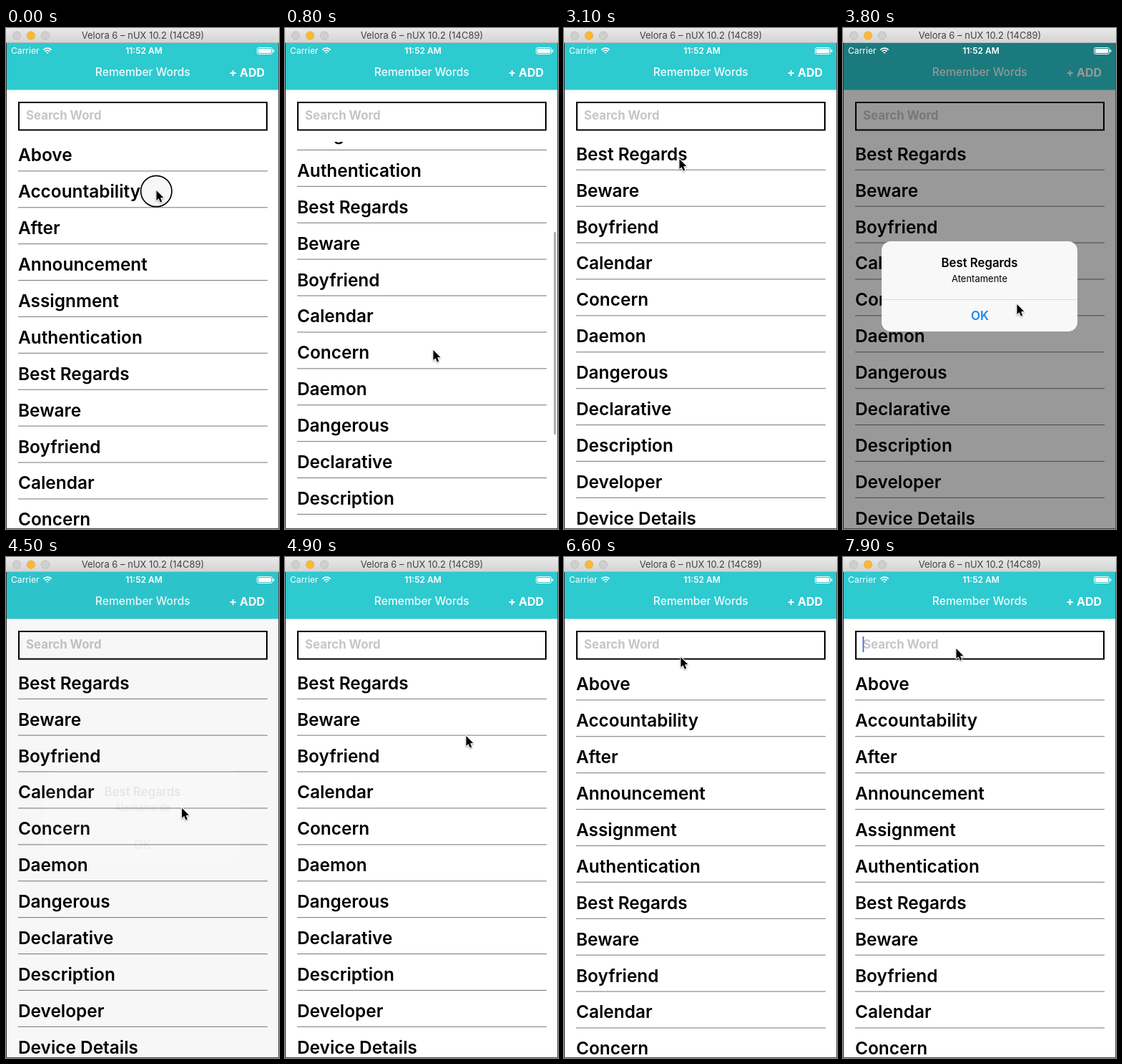
Animation, 382 px wide and 700 px high, one loop 8 s. Source, as an HTML page with a canvas:

```html
<!DOCTYPE html>
<html lang="en">
<head>
<meta charset="utf-8">
<title>Remember Words</title>
<style>
html, body { margin: 0; width: 100%; height: 100%; overflow: hidden; background: #fff; }
canvas { display: block; width: 382px; height: 700px; }
</style>
</head>
<body>
<canvas id="stage"></canvas>
<script>
const W = 382, H = 700, LOOP = 8000, STEP = 100;
const ROW = 50.9, LIST_TOP = 159, REST = 307;
const FONT = 'Inter, Roboto, sans-serif';
const WORDS = ['Above', 'Accountability', 'After', 'Announcement', 'Assignment',
  'Authentication', 'Best Regards', 'Beware', 'Boyfriend', 'Calendar', 'Concern',
  'Daemon', 'Dangerous', 'Declarative', 'Description', 'Developer', 'Device Details'];

// Moments of the session, in ms
const UP = 0, DOWN = 5100, DRAG = 300;
const TAP_ROW = 2900, TAP_OK = 4100, TAP_SEARCH = 6850;

const canvas = document.getElementById('stage');
const ctx = canvas.getContext('2d');
const ratio = window.devicePixelRatio || 1;
canvas.width = W * ratio;
canvas.height = H * ratio;

const clamp = v => Math.min(1, Math.max(0, v));
const smooth = p => p * p * (3 - 2 * p);
const speedUp = p => p * p;
const ramp = (t, from, to, ease = smooth) => ease(clamp((t - from) / (to - from)));
const pulse = (t, from, to, fade) => ramp(t, from, from + fade) * (1 - ramp(t, to, to + fade));

// Flick up: drag, then friction until the list stops
function scrollUp(t) {
  if (t < DRAG) return 65 * ramp(t, 0, DRAG, speedUp);
  return Math.min(REST, 331 - 98 * Math.exp((800 - t) / 500));
}

// Flick down: drag, coast to the top, bounce back
function scrollDown(t) {
  const half = REST / 2, speed = REST / DRAG;
  if (t < DRAG) return REST - half * ramp(t, 0, DRAG, speedUp);
  const past = t - DRAG - half / speed;
  return past < 0 ? -speed * past : -speed * past * Math.exp(-past / 56);
}

const scrollAt = t => t < DOWN ? scrollUp(t - UP) : scrollDown(t - DOWN);

const move = (from, to, x, y, ease = smooth) => ({ from, to, x, y, ease });
const MOVES = [
  move(UP, UP + DRAG, 209, 162, speedUp),
  move(DRAG, 800, 207, 450),
  move(1000, 1800, 75, 320),
  move(1800, 2000, 126, 280),
  move(2000, 2200, 161, 183),
  move(3200, 3800, 243, 386),
  move(4300, 4900, 253, 250),
  move(4900, DOWN, 215, 190),
  move(DOWN, DOWN + DRAG, 212, 343, speedUp),
  move(DOWN + DRAG, 5800, 197, 223),
  move(5900, 6800, 158, 128)
];

function pointerAt(t) {
  let x = 210, y = 227;
  for (const m of MOVES) {
    const p = ramp(t, m.from, m.to, m.ease);
    x += (m.x - x) * p;
    y += (m.y - y) * p;
  }
  const nod = Math.sin(Math.PI * ramp(t, 2300, 2700));
  return [x - 44 * nod, y + 39 * nod];
}

function isPressed(t) {
  const held = (start, length) => t >= start && t < start + length;
  return held(UP, DRAG) || held(DOWN, DRAG) ||
    [TAP_ROW, TAP_OK, TAP_SEARCH].some(tap => held(tap, 150));
}

function text(str, x, y, size, weight, color, align = 'left') {
  ctx.font = `${weight} ${size}px ${FONT}`;
  ctx.textAlign = align;
  ctx.fillStyle = color;
  ctx.fillText(str, x, y);
}

function box(x, y, w, h, color) {
  ctx.fillStyle = color;
  ctx.fillRect(x, y, w, h);
}

function round(x, y, w, h, r, color) {
  ctx.beginPath();
  ctx.roundRect(x, y, w, h, r);
  ctx.fillStyle = color;
  ctx.fill();
}

function disc(x, y, r, fill, stroke, width) {
  ctx.beginPath();
  ctx.arc(x, y, r, 0, 7);
  ctx.fillStyle = fill;
  ctx.fill();
  ctx.strokeStyle = stroke;
  ctx.lineWidth = width;
  ctx.stroke();
}

function drawTitleBar() {
  const g = ctx.createLinearGradient(0, 0, 0, 21);
  g.addColorStop(0, '#e9e9e9');
  g.addColorStop(1, '#d3d3d3');
  box(0, 0, W, 21, g);
  box(0, 20, W, 1, '#b9b9b9');
  ['#cfcfcf', '#fdb92d', '#cfcfcf'].forEach((color, i) =>
    disc(15 + 20 * i, 10.5, 5.7, color, 'rgba(0,0,0,.1)', 1));
  text('Velora 6 – nUX 10.2 (14C89)', 191.5, 15, 13, 400, '#434343', 'center');
}

function drawStatus() {
  text('Carrier', 7, 36, 12.1, 400, '#fff');
  const fan = [-Math.PI * 0.76, -Math.PI * 0.24];
  ctx.strokeStyle = '#fff';
  ctx.lineWidth = 1.7;
  for (const r of [1.5, 4.6, 7.8]) {
    ctx.beginPath();
    ctx.arc(58, 36, r, ...fan);
    ctx.stroke();
  }
  text('11:52 AM', 193, 36, 12, 600, '#fff', 'center');
  ctx.beginPath();
  ctx.roundRect(351.5, 27.5, 21, 9, 2);
  ctx.lineWidth = 1;
  ctx.stroke();
  round(353, 29, 18, 6, 1, '#fff');
  round(373.5, 30, 1.8, 4, 1, '#fff');
}

function drawHeader() {
  box(0, 21, W, 65.5, '#2dcad0');
  text('Remember Words', 191.3, 67, 15.6, 500, '#f0fcfc', 'center');
  text('+ ADD', 362, 68, 16, 700, '#fff', 'right');
}

function drawSearch(t) {
  ctx.strokeStyle = '#000';
  ctx.lineWidth = 2;
  ctx.strokeRect(18, 104, 347, 38.5);
  text('Search Word', 28, 128, 16.8, 700, '#c5c5ca');
  const focused = t - TAP_SEARCH;
  if (focused >= 0 && focused % 1000 < 500) box(27.5, 111, 1.8, 22, '#4468d6');
}

function drawList(t, scroll) {
  const dim = 0.8 * pulse(t, TAP_ROW - 100, TAP_ROW + 80, 120);
  ctx.save();
  ctx.beginPath();
  ctx.rect(0, LIST_TOP, W, H - LIST_TOP);
  ctx.clip();
  WORDS.forEach((word, i) => {
    const y = i * ROW - scroll;
    ctx.globalAlpha = word === 'Best Regards' ? 1 - dim : 1;
    text(word, 17, 186.3 + y, 24.4, 600, '#000');
    box(17, 199.3 + y, 349, 1.1, '#808080');
  });
  ctx.restore();
}

function drawScrollbar(t, scroll) {
  ctx.globalAlpha = pulse(t, UP, 1500, 250) + pulse(t, DOWN, 6000, 250);
  const top = 163 + Math.max(0, scroll) * 0.524;
  round(376.3, top, 2.6, 283 + Math.min(0, scroll), 1.3, '#a3a3a3');
  ctx.globalAlpha = 1;
}

function drawAlert(t, level) {
  const zoom = t < TAP_OK ? 1.15 - 0.15 * level : 1;
  ctx.save();
  ctx.globalAlpha = level;
  ctx.translate(191, 361);
  ctx.scale(zoom, zoom);
  round(-137, -63, 274, 126, 13, '#f8f8f8');
  text('Best Regards', 0, -27, 16.8, 600, '#000', 'center');
  text('Atentamente', 0, -6.5, 13, 400, '#000', 'center');
  box(-137, 18, 274, 1, '#dadade');
  text('OK', 0.5, 47, 17, 600, '#1c86f2', 'center');
  ctx.restore();
}

function drawPointer(t) {
  const [x, y] = pointerAt(t);
  if (isPressed(t)) disc(x + 0.3, y + 1, 21.7, 'rgba(246,246,246,.8)', '#000', 1.7);
  ctx.save();
  ctx.translate(x + 0.5, y);
  ctx.beginPath();
  [[0, 0], [0, 14], [3.2, 11.2], [5.4, 16.4], [7.8, 15.4], [5.6, 10.3], [9.9, 10]]
    .forEach(p => ctx.lineTo(...p));
  ctx.closePath();
  ctx.lineJoin = 'round';
  ctx.lineWidth = 2;
  ctx.strokeStyle = '#fff';
  ctx.shadowColor = 'rgba(0,0,0,.35)';
  ctx.shadowBlur = 2 * ratio;
  ctx.shadowOffsetY = ratio;
  ctx.stroke();
  ctx.shadowColor = 'transparent';
  ctx.fillStyle = '#000';
  ctx.fill();
  ctx.restore();
}

function draw(t) {
  const scroll = scrollAt(t);
  const level = pulse(t, TAP_ROW + 300, TAP_OK + 150, 300);
  ctx.setTransform(ratio, 0, 0, ratio, 0, 0);
  box(0, 0, W, H, '#fff');
  drawList(t, scroll);
  drawScrollbar(t, scroll);
  drawSearch(t);
  drawHeader();
  box(0, 21, W, H - 21, `rgba(0,0,0,${0.4 * level})`);
  drawStatus();
  drawAlert(t, level);
  drawTitleBar();
  box(0, 21, 1, H - 21, '#2a2a2a');
  box(W - 1, 21, 1, H - 21, '#555');
  box(0, H - 1, W, 1, '#444');
  drawPointer(t);
}

const start = performance.now();
function tick() {
  const t = (performance.now() - start) % LOOP;
  draw(Math.floor(t / STEP) * STEP);
  requestAnimationFrame(tick);
}
tick();
</script>
</body>
</html>
```
